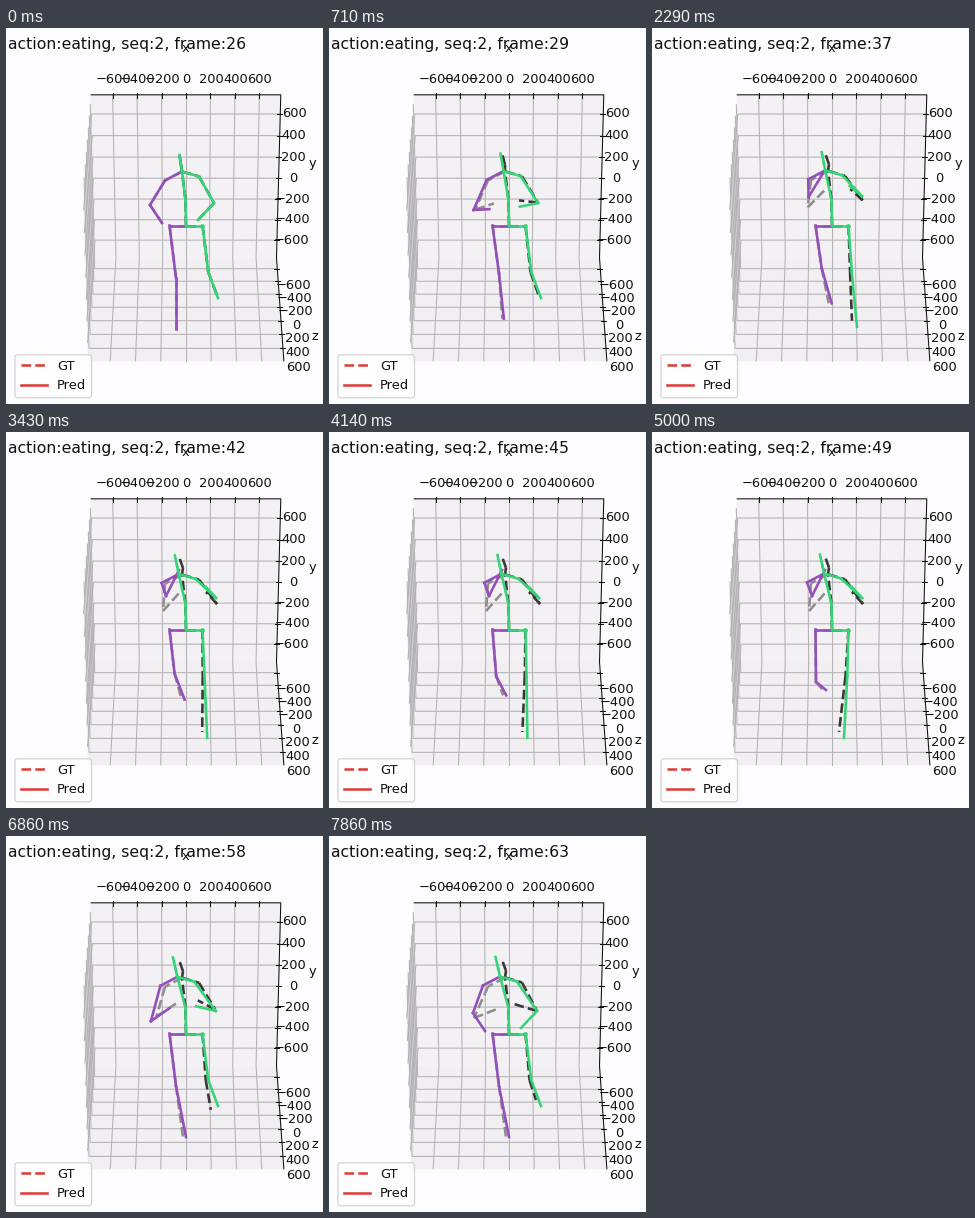
Recreate the animation shown at these times as a matplotlib script. Size 317 by 376 pixels, loop 8 s.

```python
import numpy as np
import matplotlib.pyplot as plt
from matplotlib.animation import FuncAnimation
from matplotlib.collections import LineCollection
from matplotlib.patches import FancyBboxPatch, Polygon

W, H, DPI = 317, 376, 100
N = 56
FIRST, LAST = 26, 63
PT = 72 / DPI
LIMIT = 775
TICKS = np.arange(-600, 601, 200)
BONE = 2.6 * PT
PURPLE, GREEN, RED = "#944fb8", "#36d476", "#da4240"
GREY, DARK = "#8e8e8e", "#383838"
PAPER, GRID, INK = "#fdfcfe", "#b4b2b5", "#111111"

plt.rcParams["font.family"] = "DejaVu Sans"
fig = plt.figure(figsize=(W / DPI, H / DPI), dpi=DPI, facecolor=PAPER)
ax = fig.add_axes([0, 0, 1, 1])
ax.set_xlim(0, W)
ax.set_ylim(H, 0)
ax.axis("off")


def project(x, y, z):
    """Box coordinates in -1..1 (z towards the viewer) to stage pixels."""
    depth = 1 - 0.024 * y - 0.04 * z
    return 180 + 96.3 * x / depth, (197.7 - 88.3 * y + 41.5 * z) / depth


def path(*points, color=GRID, z=2):
    xs, ys = zip(*(project(*p) for p in points))
    ax.plot(xs, ys, color=color, lw=0.76, zorder=z)


def pane(color, *corners):
    points = [project(*c) for c in corners]
    ax.add_patch(Polygon(points, fc=color, ec=color, lw=0.8, zorder=1))


def label(x, y, s, px=13, **kw):
    opts = dict(ha="center", va="center", fontsize=px * PT, color=INK, zorder=8)
    return ax.text(x, y, s, **{**opts, **kw})


def number(v):
    return str(v).replace("-", "\u2212")


def draw_box():
    pane("#f8f6f9", (-1, 1, -1), (-1, -1, -1), (-1, -1, 1), (-1, 1, 1))
    pane("#f1eff2", (-1, -1, -1), (1, -1, -1), (1, -1, 1), (-1, -1, 1))
    pane("#f3f1f4", (-1, 1, -1), (1, 1, -1), (1, -1, -1), (-1, -1, -1))
    for v in TICKS:
        t = v / LIMIT
        path((t, 1, -1), (t, -1, -1), (t, -1, 1))
        path((1, t, -1), (-1, t, -1), (-1, t, 1))
        path((1, -1, t), (-1, -1, t), (-1, 1, t))

        x, y = project(t, 1, -1)
        ax.plot([x, x], [y - 2, y + 3], color=INK, lw=0.76, zorder=3)
        label(x + 0.5, 51.5, number(v))
        for x, y, dx, dy in ((*project(1, t, -1), 14.5, 0),
                             (*project(1, -1, t), 16, 18 + t)):
            ax.plot([x - 3, x + 2], [y, y], color=INK, lw=0.76, zorder=3)
            label(x + dx, y + dy, number(v))
    path((-1, 1, -1), (1, 1, -1), (1, -1, -1), (1, -1, 1), color=INK, z=3)
    label(180, 20, "x")
    label(306, 135, "y")
    label(309, 309, "z")


def draw_legend():
    ax.add_patch(FancyBboxPatch((11.5, 329.3), 71.5, 38, zorder=7,
                                boxstyle="round,pad=2.5", fc="white",
                                ec="#cccccc", lw=0.94, alpha=0.8))
    for y, name, style in ((337.2, "GT", "--"), (356.6, "Pred", "-")):
        ax.plot([14.5, 40.5], [y, y], color=RED, lw=BONE, ls=style, zorder=8)
        label(51, y + 4.7, name, ha="left", va="baseline")


# Arm poses on the way from hanging to raised.
PRED_ARMS = dict(l_elbow=[(144, 177), (145, 186), (160, 164)],
                 l_hand=[(156, 195), (164, 170), (173, 138)],
                 r_elbow=[(208, 175), (210, 175), (210, 166)],
                 r_hand=[(192, 192), (190, 168), (200, 155)])
TRUE_ARMS = dict(l_elbow=[(145, 182), (157, 179)],
                 l_hand=[(168, 173), (174, 160)],
                 r_elbow=[(208, 175), (211, 172)],
                 r_hand=[(185, 168), (200, 160)])


def along(points, u):
    """Point at share u of a polyline with evenly timed corners."""
    at = np.linspace(0, 1, len(points))
    return np.array([np.interp(u, at, axis) for axis in zip(*points)])


def pose(t, true):
    s = (t - FIRST) / (LAST - FIRST)
    gap = min(1, 6 * s) if true else 0  # truth and prediction drift apart
    lean = 0 if true else np.sqrt(s)
    raised = min(1, 1.1 * np.sin(np.pi * s))
    step = np.interp(t, [26, 49, 56], [0, 1, 0])
    plant = np.interp(t, [33, 38, 50, 61 if true else 57], [0, 1, 1, 0])
    bend = step ** 4

    j = {}
    for name, points in PRED_ARMS.items():
        arm, other = along(points, raised), along(TRUE_ARMS[name], raised)
        j[name] = arm + gap * (other - arm)

    top = np.array([173.5, 127 - 2 * s])
    j["head"] = top + lean * np.array([-7, -4])
    j["neck"] = top + (2.5, 16.5) + lean * np.array([-5, -1])
    j["jaw"] = 0.4 * j["head"] + 0.6 * j["neck"] + (2 * gap, 0)

    sway = 10 * min(1, 6 * s)
    j["l_knee"] = np.array([170 - 6 * bend, 250 - 40 * step * (1 - step)])
    j["l_foot"] = np.array([170 + sway - 6 * bend - 3 * gap,
                            301 - 43 * step ** 0.7])
    j["r_foot"] = np.array([212 - 8 * plant - 12 * bend - 5 * gap,
                            270 + 36 * plant - 6 * gap])
    j["r_knee"] = np.array([197 + 0.35 * (j["r_foot"][0] - 197), 244])
    return j


def chain(*points):
    return list(zip(points, points[1:]))


def skeleton(t, true):
    """Bones of the left and the right half of the body."""
    j = pose(t, true)
    neck = j["neck"]
    pelvis, spine = (180, 197.5), (179.5, 172)
    left = (chain(neck, neck + (-17, 9), j["l_elbow"], j["l_hand"])
            + chain(pelvis, (163.5, 197.5), j["l_knee"], j["l_foot"]))
    right = (chain(pelvis, spine, neck, j["jaw"], j["head"])
             + chain(neck, neck + (17, 5), j["r_elbow"], j["r_hand"])
             + chain(pelvis, (196.5, 197.5), j["r_knee"], j["r_foot"]))
    return left, right


def bones(color, style, cap, z):
    return ax.add_collection(LineCollection(
        [], colors=color, linewidths=BONE, linestyles=style, capstyle=cap,
        zorder=z), autolim=False)


draw_box()
draw_legend()
title = label(2, 21, "", 15.65, ha="left", va="baseline")
true_lines = [bones(c, "--", "butt", 4) for c in (GREY, DARK)]
pred_lines = [bones(c, "-", "projecting", 5) for c in (PURPLE, GREEN)]


def update(i):
    t = FIRST + int(i * 2 / 3 + 0.5)
    title.set_text(f"action:eating, seq:2, frame:{t}")
    sides = skeleton(t, True) + skeleton(t, False)
    for lines, segments in zip(true_lines + pred_lines, sides):
        lines.set_segments(segments)
    return [title, *true_lines, *pred_lines]


anim = FuncAnimation(fig, update, frames=N, interval=8000 / N, repeat=True,
                     repeat_delay=0, blit=False)
plt.show()
```
